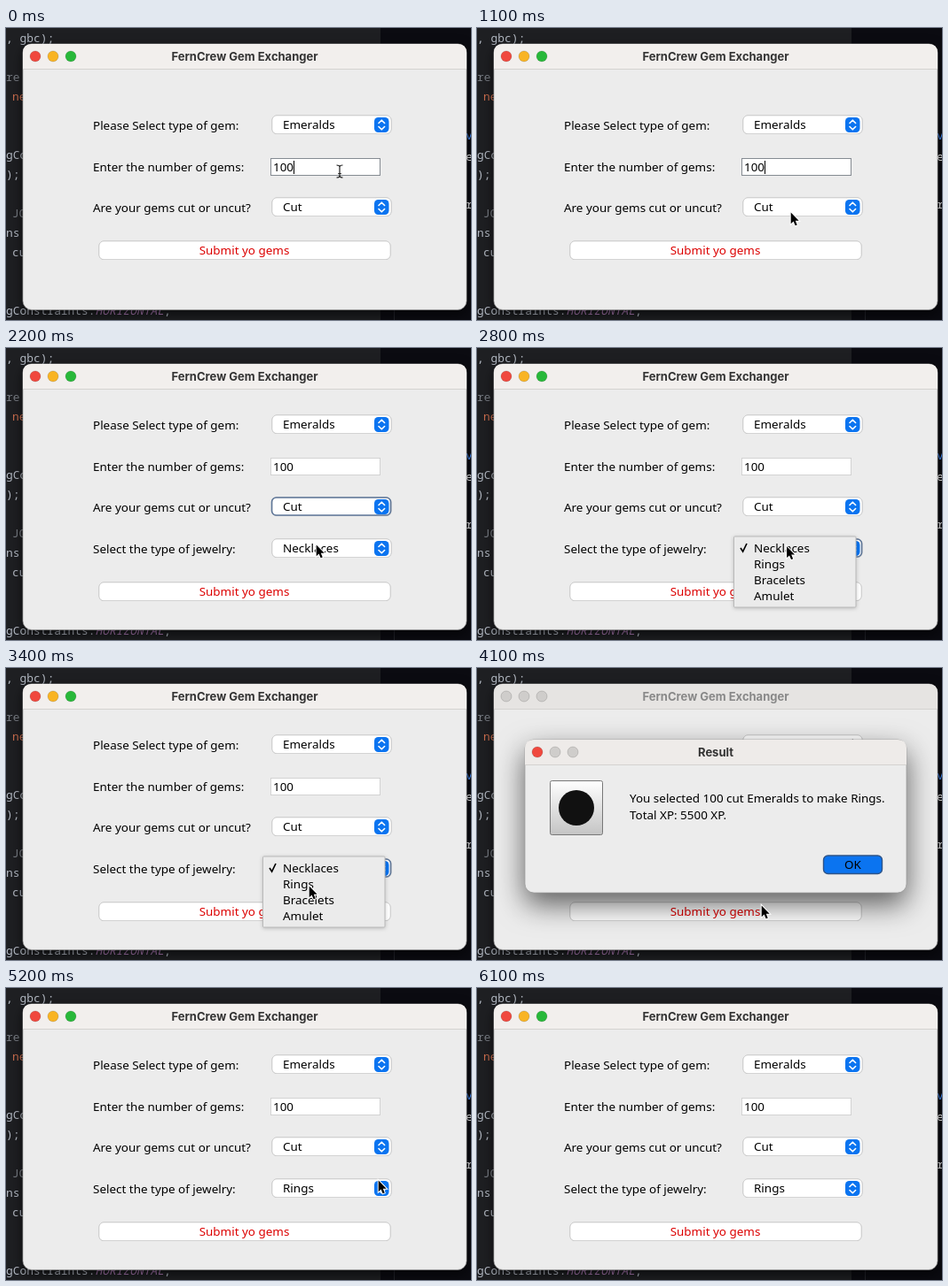
Recreate the animation shown at these times as an HTML page. Size 524 by 330 pixels, loop 6.2 s.

```html
<!DOCTYPE html>
<html lang="en">
<head>
<meta charset="utf-8">
<title>Gem form</title>
<style>
html, body { margin: 0; width: 100%; height: 100%; overflow: hidden; background: #1e1f22; }
svg { display: block; width: 524px; height: 330px; }
text { font: 13.45px "Noto Sans", sans-serif; fill: #000; white-space: pre; }
.bold { font: 700 13px Inter, sans-serif; fill: #333; text-anchor: middle; }
.mid { text-anchor: middle; }
.code text { font: 500 12.9px "Noto Sans Mono", monospace; fill: #b4bac4; }
.window { filter: drop-shadow(0 5px 7px #0009); }
.dialog { filter: drop-shadow(0 13px 16px #0009); }
.soft { stroke: #d2d2d2; stroke-width: .7; filter: drop-shadow(0 .6px .6px #0005); }
</style>
</head>
<body>
<svg id="stage" viewBox="0 0 524 330"></svg>
<script>
const LOOP = 6200, STEP = 100;
const stage = document.getElementById('stage');

const rect = (x, y, w, h, r, fill, extra = '') =>
  `<rect x="${x}" y="${y}" width="${w}" height="${h}" rx="${r}" fill="${fill}" ${extra}/>`;
const text = (x, y, s, extra = '') => `<text x="${x}" y="${y}" ${extra}>${s}</text>`;
const lights = (x, y, colors) => colors.map((c, i) =>
  `<circle cx="${x + i * 20}" cy="${y}" r="6" fill="${c}" stroke="#0003" stroke-width=".7"/>`).join('');

const GRAY = '#cfcdcb', RED = '#f0483e';
const EDGE = 'stroke="#999" stroke-width=".7"';
const titleBar = (x, y, w, color) =>
  `<path d="M${x} ${y + 28}v-18q0-10 10-10h${w - 20}q10 0 10 10v18z" fill="${color}"/>` +
  rect(x, y + 28, w, 1, 0, '#d4d2d0');

function editor() {
  const lines = [
    [0, 16, ', gbc);'], [0, 60, 're', '#7a7e85'], [7, 82, 'new', '#cf7050'],
    [0, 148, 'gCon'], [0, 170, ');'], [7, 214, 'JOp', '#7a7e85'],
    [0, 236, 'ns'], [7, 258, 'cut'], [0, 324, 'gConstraints.'],
    [518, 126, 'v', '#3f8cff'], [518, 150, 'e', '#fff'], [518, 204, 'r', '#eee']
  ];
  return rect(0, 0, 524, 330, 0, '#1e1f22') + rect(422, 0, 102, 330, 0, '#0b0b11') +
    rect(437, 319, 1, 11, 0, '#22232a') + '<g class="code">' +
    lines.map(([x, y, s, c]) => text(x, y, s, c ? `style="fill:${c}"` : '')).join('') +
    text(100.6, 324, 'HORIZONTAL', 'style="fill:#a877b0;font-style:italic"') +
    text(178, 324, ',') + '</g>';
}

function combo(cy, value, { focused = false, inactive = false } = {}) {
  const ring = focused
    ? rect(299.5, cy - 10, 134, 20, 5, 'none', 'stroke="#5f7799" stroke-width="1.6"') : '';
  return rect(300, cy - 10, 134, 20.5, 5, '#fff', 'class="soft"') + ring +
    rect(415, cy - 8, 16.5, 17, 4.5, inactive ? '#fff' : '#0b74f0') +
    `<path d="M420 ${cy - 1.5}l3.3-3.3 3.3 3.3M420 ${cy + 2.5}l3.3 3.3 3.3-3.3"
      fill="none" stroke="${inactive ? '#555' : '#fff'}" stroke-width="1.6" stroke-linecap="round" stroke-linejoin="round"/>` +
    text(312, cy + 5, value);
}

function field(cy, focused, caret) {
  const look = focused ? 'stroke="#858b92"' : 'class="soft"';
  return rect(298.5, cy - 9.5, 123, 19, 0, '#fff', look) +
    text(301, cy + 5, '100') + (caret ? rect(324, cy - 7, 1, 15, 0, '#000') : '');
}

const popup = (cy, items) =>
  rect(289.5, cy - 13, 137.5, items.length * 18 + 8, 1, '#ebebeb',
    'stroke="#b9b9b9" style="filter:drop-shadow(0 1px 2px #0003)"') +
  `<path d="M297 ${cy}l2.6 4L304 ${cy - 5}" fill="none" stroke="#000" stroke-width="1.7"/>` +
  items.map((s, i) => text(312, cy + 5 + i * 18, s)).join('');

function mainWindow(t) {
  const extended = t >= 1900, modal = t >= 3900 && t < 5100;
  const top = extended ? 87 : 110;
  const submit = extended ? 275 : 251;
  const typing = t < 1300;
  const choosing = t >= 2600 && t < 3600;
  let s = '<g class="window">' + rect(19, 18, 500, 300.5, 10, '#ececec', EDGE) + '</g>' +
    titleBar(19, 18, 500, modal ? '#e6e4e2' : '#f2efed') +
    lights(33, 32, modal ? [GRAY, GRAY, GRAY] : [RED, '#f9b424', '#28b83a']) +
    text(269, 36.5, 'FernCrew Gem Exchanger', `class="bold" ${modal ? 'style="fill:#888"' : ''}`) +
    text(98, top + 5, 'Please Select type of gem:') +
    combo(top - 1, 'Emeralds', { inactive: modal }) +
    text(98, top + 52, 'Enter the number of gems:') +
    field(top + 47, typing, typing && t % 1000 < 500) +
    text(98, top + 98, 'Are your gems cut or uncut?') +
    combo(top + 92, 'Cut', { focused: t >= 1300 && t < 2600, inactive: modal });
  if (extended) {
    s += text(98, 232, 'Select the type of jewelry:') +
      combo(226, t < 3600 ? 'Necklaces' : 'Rings',
        { focused: t >= 2600 && t < 3800, inactive: modal });
  }
  s += rect(105, submit - 10, 328, 20.5, 5, '#fff', 'class="soft"') +
    text(268.5, submit + 4.5, 'Submit yo gems', 'class="mid" style="fill:#dc0000"');
  if (t >= 1300 && t < 1900) s += popup(202, ['Cut', 'Uncut']);
  if (choosing) s += popup(226, ['Necklaces', 'Rings', 'Bracelets', 'Amulet']);
  return s + (modal ? dialog() : '');
}

function dialog() {
  return '<g class="dialog">' + rect(54, 81, 430, 173, 10, '#ececec', EDGE) + '</g>' +
    titleBar(54, 81, 430, '#eeebe9') + lights(68, 95, [RED, GRAY, GRAY]) +
    text(269, 99.5, 'Result', 'class="bold"') +
    '<linearGradient id="tile" x2="0" y2="1"><stop stop-color="#fff"/><stop offset="1" stop-color="#c4c4c4"/></linearGradient>' +
    rect(82.5, 127.5, 59, 61, 2, 'url(#tile)', 'stroke="#777"') +
    '<circle cx="112" cy="158" r="20" fill="#111"/>' +
    text(172, 152, 'You selected 100 cut Emeralds to make Rings.') +
    text(172, 171, 'Total XP: 5500 XP.') +
    rect(390.5, 212, 66, 20.5, 5, '#0b74f0', 'stroke="#2f5488" stroke-width="1.4"') +
    text(423.5, 227, 'OK', 'class="mid"');
}

// Pointer stops: time, x, y
const path = [
  [0, 376, 162], [400, 376, 162], [1000, 353, 208], [1900, 353, 208],
  [2200, 349, 222], [2700, 349, 222], [3300, 341, 246], [3600, 341, 246],
  [3900, 320, 268], [4300, 320, 268], [4900, 419, 217], [5300, 419, 217],
  [5800, 530, 335], [LOOP, 530, 335]
];

function pointer(t) {
  const i = path.findIndex(p => p[0] > t);
  const [t0, x0, y0] = path[i - 1], [t1, x1, y1] = path[i];
  const u = (t - t0) / (t1 - t0), e = u * u * (3 - 2 * u);
  const x = x0 + (x1 - x0) * e, y = y0 + (y1 - y0) * e;
  const beam = t < 1000 && y < 168;
  const shape = beam
    ? '<path d="M-3.5-7Q0-7 0-5Q0-7 3.5-7M0-5V5M-3.5 7Q0 7 0 5Q0 7 3.5 7M-1.8 2.5H1.8" fill="none" stroke="#222" stroke-width="1.2"/>'
    : '<path transform="translate(.7 .5) scale(.88)" d="M0 0V14.5L3.3 11.5 5.6 16.8 8 15.8 5.8 10.6H10.2Z" stroke="#fff" stroke-width="2.2" paint-order="stroke"/>';
  return `<g transform="translate(${x} ${y})">${shape}</g>`;
}

let shown = -1;
function frame() {
  const t = Math.floor(performance.now() % LOOP / STEP) * STEP;
  if (t !== shown) {
    stage.innerHTML = editor() + mainWindow(t) + pointer(t);
    shown = t;
  }
  requestAnimationFrame(frame);
}
frame();
</script>
</body>
</html>
```
